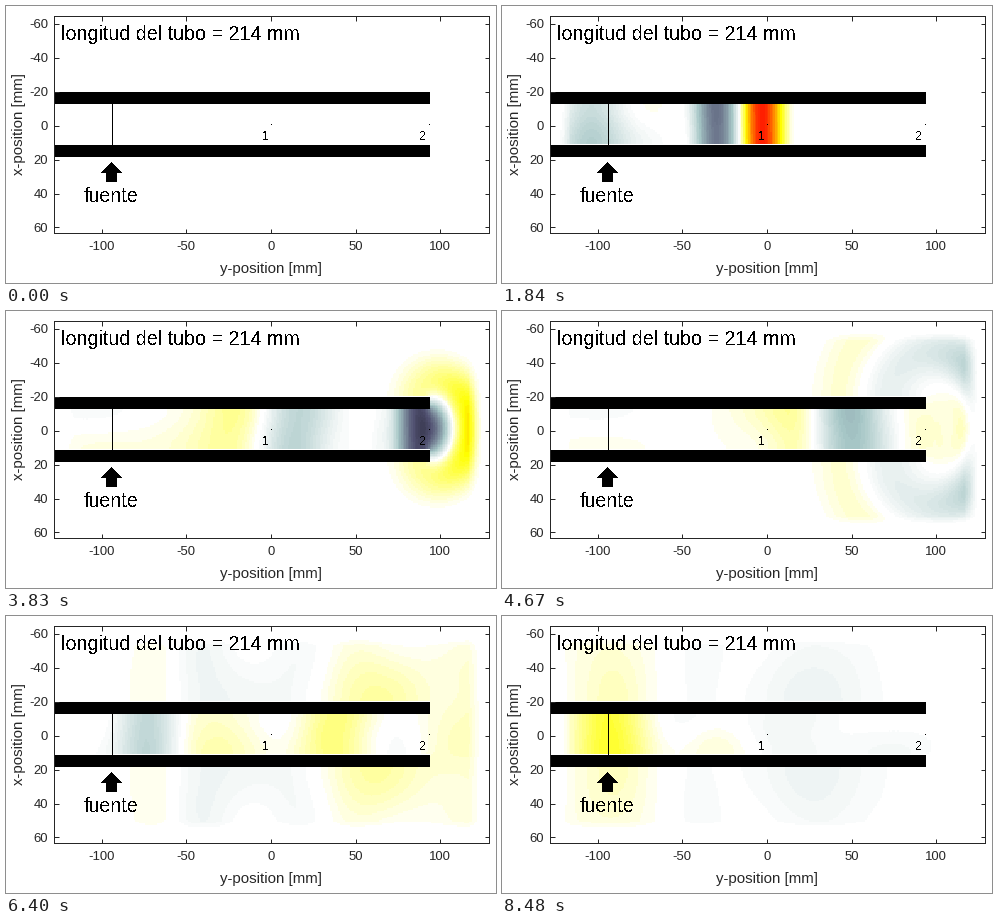
A matplotlib script that plays this animation: 490x277 px, repeating every 8570 ms.

```python
import numpy as np
import matplotlib as mpl
import matplotlib.pyplot as plt
from matplotlib.animation import FuncAnimation
from matplotlib.colors import ListedColormap
from matplotlib.patches import Polygon, Rectangle

W, H, DPI = 490, 277, 100
LOOP_MS, N_FRAMES = 8570, 286
INTERVAL = LOOP_MS / N_FRAMES
INK = "#262626"

plt.rcParams.update({
    "font.family": "Liberation Sans",
    "axes.unicode_minus": False,
    "toolbar": "None",
})

# Runs of evenly spaced picture changes: first ms, last ms, count
RUNS = [(160, 930, 11), (1020, 1840, 12), (1930, 2160, 4), (2320, 3090, 11),
        (3180, 3960, 11), (4050, 4350, 5), (4510, 5290, 11), (5380, 6150, 11),
        (6240, 7020, 11), (7100, 7950, 12), (8030, 8480, 7)]
CHANGES = np.concatenate([np.linspace(*run) for run in RUNS])

# Acoustic grid: one cell per millimetre, padded with a damping sponge
NX, NY, PAD = 257, 128, 40
X0, Y0 = -128.5, -65
COURANT, SUBSTEPS = 0.62, 8
EMITTER, TUBE_END = -94, 93


def pulse(t):
    """One smooth pressure cycle sent out by the emitter."""
    phase = 2 * np.pi * (t - 0.5) / 13.9
    if not 0 < phase < 2 * np.pi:
        return 0.0
    value = 0.76 * np.sin(phase) * np.sin(phase / 2)
    return value if value > 0 else 0.88 * value


def edge_fade(n, start, stop):
    i = np.arange(n)
    return np.clip((np.minimum(i, n - 1 - i) - start) / (stop - start), 0, 1)


def sponge(n):
    i = np.arange(n)
    depth = np.clip(PAD - np.minimum(i, n - 1 - i), 0, PAD)
    return np.exp(-(0.012 * depth) ** 2)


def simulate(n_states):
    shape = (NY + 2 * PAD, NX + 2 * PAD)
    y = np.arange(shape[0]) - PAD + Y0 + 0.5
    x = np.arange(shape[1]) - PAD + X0 + 0.5
    in_wall = ((y > -20) & (y < -13)) | ((y > 11) & (y < 18))
    is_open = ~(in_wall[:, None] & (x <= TUBE_END)[None, :])
    open_x = (is_open[:, 1:] & is_open[:, :-1]).astype(np.float32)
    open_y = (is_open[1:] & is_open[:-1]).astype(np.float32)
    damping = np.outer(sponge(shape[0]), sponge(shape[1])).astype(np.float32)
    fade = np.outer(edge_fade(NY, 6, 12), edge_fade(NX, 4, 12))

    # A slight tilt across the emitter excites the transverse mode
    rows = np.flatnonzero((y > -13) & (y < 11))
    column = int(np.argmin(abs(x - EMITTER)))
    weight = 1 + 0.08 * np.cos(np.pi * (y[rows] + 13) / 24)

    p = np.zeros(shape, np.float32)
    previous = p.copy()
    states = [np.zeros((NY, NX))]
    for step in range(1, (n_states - 1) * SUBSTEPS + 1):
        flux_x = (p[:, 1:] - p[:, :-1]) * open_x
        flux_y = (p[1:] - p[:-1]) * open_y
        lap = np.zeros_like(p)
        lap[:, :-1] += flux_x
        lap[:, 1:] -= flux_x
        lap[:-1] += flux_y
        lap[1:] -= flux_y
        new = 2 * p - previous + COURANT ** 2 * lap
        gain = pulse(step / SUBSTEPS) - pulse((step - 1) / SUBSTEPS)
        new[rows, column] += 2 * COURANT * gain * weight
        previous, p = p * damping, new * damping
        if step % SUBSTEPS == 0:
            states.append(p[PAD:-PAD, PAD:-PAD] * fade)
    return states


def pt(pixels):
    return pixels * 72 / DPI


states = simulate(len(CHANGES) + 1)
levels = np.linspace(0, 1, 64)
cmap = ListedColormap(np.vstack([mpl.colormaps["bone"](levels),
                                 mpl.colormaps["hot_r"](levels)]))

fig = plt.figure(figsize=(W / DPI, H / DPI), dpi=DPI, facecolor="white")
ax = fig.add_axes([47.5 / W, 1 - 226.5 / H, 435 / W, 217 / H])
field = ax.imshow(states[0], cmap=cmap, vmin=-1, vmax=1, aspect="auto",
                  interpolation="nearest",
                  extent=(X0, X0 + NX, Y0 + NY, Y0))
ax.set_xticks(range(-100, 101, 50))
ax.set_yticks(range(-60, 61, 20))
ax.tick_params(direction="in", top=True, right=True, length=pt(4.5),
               width=pt(1), color=INK, labelcolor=INK, labelsize=pt(13.1))
ax.tick_params(axis="x", pad=pt(9))
ax.tick_params(axis="y", pad=pt(5.5))
ax.set_axisbelow(False)
for spine in ax.spines.values():
    spine.set(linewidth=pt(1), color=INK)

label = dict(size=pt(15), color=INK, ha="center", va="baseline")
fig.text(265 / W, 1 - 266.5 / H, "y-position [mm]", **label)
fig.text(16.5 / W, 1 - 118 / H, "x-position [mm]", rotation=90,
         rotation_mode="anchor", **label)

# Tube walls, emitter line, arrow and microphone points
black = dict(color="black", linewidth=0, antialiased=False)
for top in (-19.9, 11.2):
    ax.add_patch(Rectangle((X0, top), 222.3, 7.2, **black))
ax.plot([EMITTER, EMITTER], [-13, 11.5], color="black", lw=pt(1),
        antialiased=False)
half = np.array([(0, 22), (5.9, 27.9), (2.9, 27.9), (2.9, 33.2)])
arrow = np.vstack([half, half[::-1] * (-1, 1)]) + (EMITTER, 0)
ax.add_patch(Polygon(arrow, **black))
for x in (0.1, 93.6):
    ax.add_patch(Rectangle((x, -1.2), 0.6, 0.6, **black))

for x, y, text, size in [(-124, -50.8, "longitud del tubo = 214 mm", 19.7),
                         (-110.6, 44.9, "fuente", 19.7),
                         (-5, 8.3, "1", 12), (87.4, 8.3, "2", 12)]:
    ax.text(x, y, text, size=pt(size), color="black", va="baseline",
            antialiased=False)


def update(frame):
    now = (frame + 0.5) * INTERVAL
    field.set_data(states[np.searchsorted(CHANGES, now, side="right")])
    return [field]


anim = FuncAnimation(fig, update, frames=N_FRAMES, interval=INTERVAL,
                     repeat=True, repeat_delay=0, blit=False)
plt.show()
```
